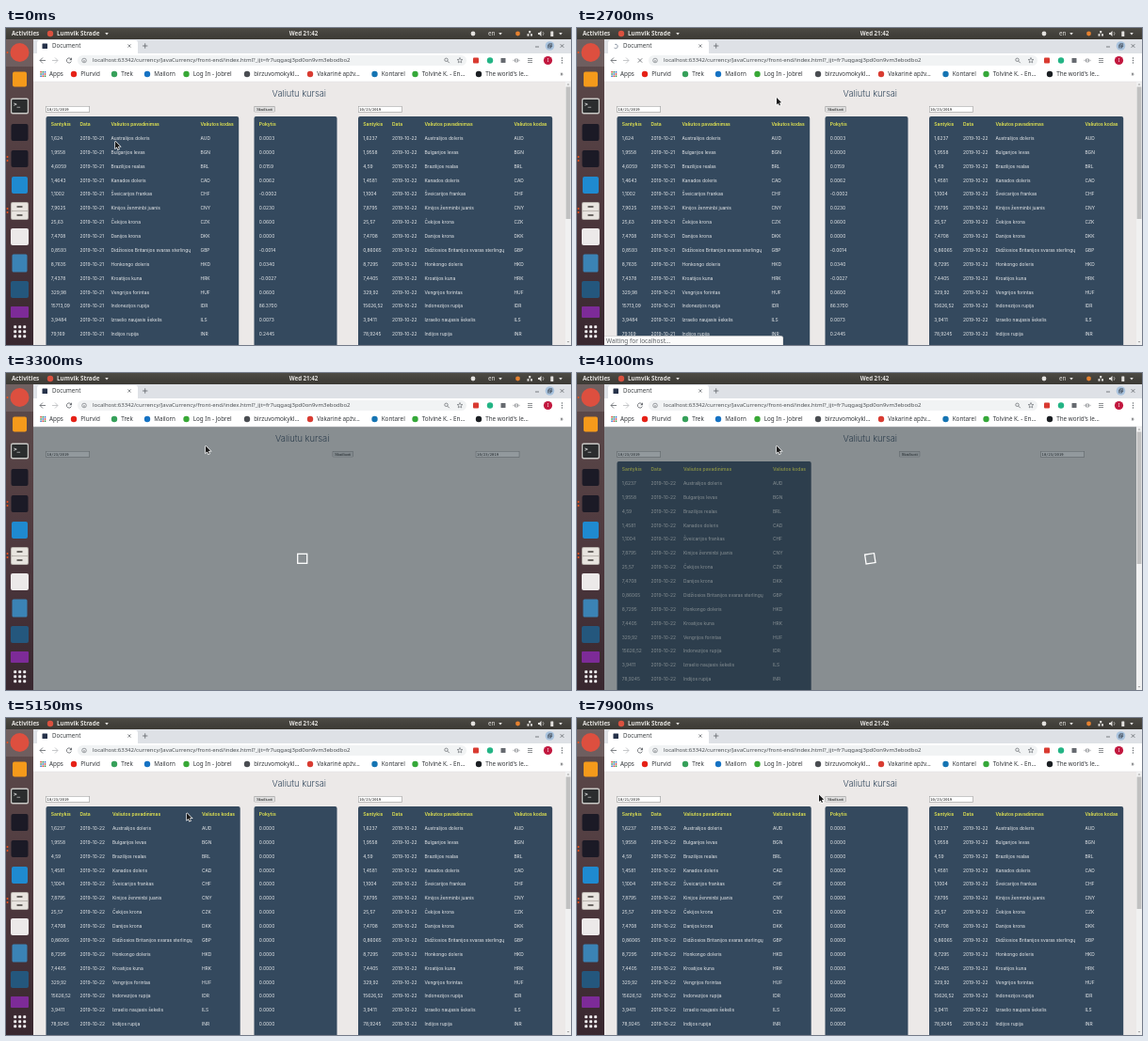
Write an HTML page with a canvas that moves like this. It is 600 px wide and 337 px high and loops after 8 s.

```html
<!DOCTYPE html>
<html lang="lt">
<head>
<meta charset="utf-8">
<title>Valiutu kursai</title>
<style>
html, body { margin: 0; width: 100%; height: 100%; overflow: hidden; }
canvas { display: block; width: 600px; height: 337px; }
</style>
</head>
<body>
<canvas id="stage"></canvas>
<script>
const W = 600, H = 337, LOOP = 8000;
const canvas = document.getElementById('stage');
const dpr = window.devicePixelRatio || 1;
canvas.width = W * dpr;
canvas.height = H * dpr;
const ctx = canvas.getContext('2d');

const UI = '"Noto Sans", sans-serif';
const BODY = 'Inter, sans-serif';
const MONO = '"DejaVu Sans Mono", monospace';

// name | code | first rate | second rate | difference
const rows = `Australijos doleris|AUD|1,624|1,6237|0.0003
Bulgarijos levas|BGN|1,9558|1,9558|0.0000
Brazilijos realas|BRL|4,6059|4,59|0.0159
Kanados doleris|CAD|1,4643|1,4581|0.0062
Šveicarijos frankas|CHF|1,1002|1,1004|-0.0002
Kinijos ženminbi juanis|CNY|7,9025|7,8795|0.0230
Čekijos krona|CZK|25,63|25,57|0.0600
Danijos krona|DKK|7,4708|7,4708|0.0000
Didžiosios Britanijos svaras sterlingų|GBP|0,8593|0,86065|-0.0014
Honkongo doleris|HKD|8,7635|8,7295|0.0340
Kroatijos kuna|HRK|7,4378|7,4405|-0.0027
Vengrijos forintas|HUF|329,98|329,92|0.0600
Indonezijos rupija|IDR|15713,09|15626,52|86.3700
Izraelio naujasis šekelis|ILS|3,9484|3,9411|0.0073
Indijos rupija|INR|79,169|78,9245|0.2445`.split('\n').map(row => row.split('|'));

// time, x, y of the pointer tip
const pointerPath = [
  [0, 116, 120.5], [800, 165, 116], [1000, 166, 116], [1150, 166, 116], [1450, 178, 116],
  [2000, 178, 116], [2600, 212, 74], [2700, 212, 74], [2950, 212, 77.5], [4550, 212, 77.5],
  [4850, 196, 97], [4950, 196, 97], [5150, 192, 101], [5250, 192, 101], [5750, 55, 84],
  [5800, 55, 84], [5950, 51, 84], [6900, 51, 84], [7400, 210, 84], [7550, 210, 84], [7900, 257, 81.5]
];

const LOAD_START = 1650, OVERLAY_START = 2750, LOAD_END = 3300;
const LEFT_READY = 3550, ALL_READY = 4300, DATE_EDITED = 6500;
const SPIN_START = 2735, SPIN_CYCLE = 2000;

function rect(x, y, w, h, fill, radius = 0) {
  ctx.fillStyle = fill;
  ctx.beginPath();
  ctx.roundRect(x, y, w, h, radius);
  ctx.fill();
}

function disc(x, y, r, fill) {
  ctx.fillStyle = fill;
  ctx.beginPath();
  ctx.arc(x, y, r, 0, Math.PI * 2);
  ctx.fill();
}

function line(color, width, ...pts) {
  ctx.strokeStyle = color;
  ctx.lineWidth = width;
  ctx.beginPath();
  pts.forEach(([x, y]) => ctx.lineTo(x, y));
  ctx.stroke();
}

function arc(x, y, r, from, to, color, width) {
  ctx.strokeStyle = color;
  ctx.lineWidth = width;
  ctx.beginPath();
  ctx.arc(x, y, r, from, to);
  ctx.stroke();
}

function polygon(fill, ...pts) {
  ctx.fillStyle = fill;
  ctx.beginPath();
  pts.forEach(([x, y]) => ctx.lineTo(x, y));
  ctx.fill();
}

function text(str, x, y, size, color, { font = UI, weight = 400, align = 'left' } = {}) {
  ctx.font = `${weight} ${size}px ${font}`;
  ctx.textAlign = align;
  ctx.fillStyle = color;
  ctx.fillText(str, x, y + size * 0.36);
}

function caret(x, y, color) {
  polygon(color, [x - 1.8, y - 1], [x + 1.8, y - 1], [x, y + 1.4]);
}

function cross(x, y, r, color, width) {
  line(color, width, [x - r, y - r], [x + r, y + r]);
  line(color, width, [x - r, y + r], [x + r, y - r]);
}

function shade(y0, y1, ...colors) {
  const gradient = ctx.createLinearGradient(0, y0, 0, y1);
  colors.forEach((color, i) => gradient.addColorStop(i / (colors.length - 1), color));
  return gradient;
}

// CSS "ease" curve
function ease(p) {
  const bezier = (a, b, s) => 3 * a * s * (1 - s) ** 2 + 3 * b * s * s * (1 - s) + s ** 3;
  let lo = 0, hi = 1;
  for (let i = 0; i < 20; i++) {
    const mid = (lo + hi) / 2;
    if (bezier(0.25, 0.25, mid) < p) lo = mid; else hi = mid;
  }
  return bezier(0.1, 1, lo);
}

function drawTopBar() {
  rect(0, 0, W, 12, shade(0, 12, '#4c4a44', '#3b3934'));
  const light = '#e4e2df', bold = { weight: 600 };
  text('Activities', 6, 6, 6.3, light, bold);
  disc(47, 6, 3.2, '#d9513f');
  text('Lumvik Strade', 54, 6, 6.3, light, bold);
  caret(107, 6, light);
  text('Wed 21:42', 316, 6, 6.1, light, { weight: 600, align: 'center' });
  disc(496, 6, 2.4, light);
  text('en', 512, 6, 6.3, light);
  caret(525, 6, light);
  disc(543.5, 6, 2.4, '#e5812f');
  rect(553.5, 6.2, 2, 2.4, light);
  rect(557, 6.2, 2, 2.4, light);
  rect(555.2, 3, 2, 2.4, light);
  polygon(light, [565, 5], [566.5, 5], [568.5, 3], [568.5, 9], [566.5, 7], [565, 7]);
  arc(568.5, 6, 2.4, -0.9, 0.9, light, 0.6);
  rect(578.3, 3.4, 3, 5.6, light, 0.5);
  caret(589, 6, light);
}

function drawDock() {
  rect(0, 12, 29, H - 12, shade(12, H, '#5c4b4b', '#503a3f', '#38272f'));
  rect(0, 12, 29, 29, 'rgba(255,255,255,.12)');

  disc(14.5, 26, 10, '#dd4f3f');
  rect(7, 46.5, 15, 16, '#f59a1b', 2);
  rect(5, 74.5, 19, 17, '#c9c9c6', 2);
  rect(6.2, 76, 16.6, 14, '#2b2d2e', 1);
  text('>_', 8, 81, 6, '#f2f2f2', { font: MONO, weight: 700 });
  rect(5.5, 102, 18, 18, '#1b1a26', 2);
  rect(5.5, 130, 18, 18, '#1b1a26', 2);
  rect(6, 158, 17, 18, '#1f8ad0', 2);

  rect(5, 185, 19, 19, '#b9b4ae', 2);
  rect(6, 186, 17, 8, '#e8e4df', 1);
  rect(6, 195, 17, 8, '#e8e4df', 1);
  rect(11.5, 189, 6, 2, '#6c6864', 0.5);
  rect(11.5, 198, 6, 2, '#6c6864', 0.5);

  rect(5, 213, 19, 18, '#ece9e9', 2);
  rect(6.5, 240.5, 16, 19, '#3b83b5', 1.5);
  rect(5, 269, 19, 18, '#24577d', 2);
  rect(5, 296, 19, 12, '#7d2b98', 1);

  [26, 137, 141, 192, 196].forEach(y => disc(1.5, y, 1, '#e95420'));
  for (let i = 0; i < 9; i++)
    rect(8.2 + (i % 3) * 5, 316.3 + Math.floor(i / 3) * 5, 3, 3, '#f0eef0', 0.8);
}

function drawBrowser(t) {
  const loading = t >= LOAD_START && t < LOAD_END;
  const gray = '#5f6368';
  rect(29, 12, W - 29, 15, '#dee1e6');
  rect(33, 13, 107, 15, '#fff', [3, 3, 0, 0]);
  if (loading) {
    const a = t / 1000 * Math.PI * 2;
    arc(41, 19.5, 2.2, a, a + 4.2, '#6f7b8c', 0.8);
  } else {
    rect(38.5, 16.5, 5.5, 5.5, '#26324a', 0.5);
  }
  text('Document', 49, 19, 6.2, '#3c4043');
  cross(131, 19, 1.6, gray, 0.7);
  line(gray, 0.8, [145, 19], [150.4, 19]);
  line(gray, 0.8, [147.7, 16.3], [147.7, 21.7]);
  line(gray, 0.8, [562, 20], [566, 20]);
  disc(577.5, 19, 4.8, '#a9c3de');
  ctx.strokeStyle = '#46505c';
  ctx.lineWidth = 0.7;
  ctx.strokeRect(575.7, 18, 3, 3);
  ctx.strokeRect(576.8, 16.8, 3, 3);
  cross(590.5, 19, 1.8, gray, 0.8);

  rect(29, 27, W - 29, 30, '#fff');
  rect(76, 29, 413, 11, '#f1f3f4', 5.5);
  line(gray, 0.8, [42, 34.5], [36, 34.5]);
  line(gray, 0.8, [39, 31.5], [36, 34.5], [39, 37.5]);
  line('#b8babd', 0.8, [49, 34.5], [55, 34.5]);
  line('#b8babd', 0.8, [52, 31.5], [55, 34.5], [52, 37.5]);
  if (loading) {
    cross(67, 34.5, 2.2, gray, 0.8);
  } else {
    arc(67, 34.5, 2.6, 0.4, 5.5, gray, 0.8);
    polygon(gray, [69.9, 31.3], [69.9, 34.2], [67.2, 34.2]);
  }
  arc(83, 34.5, 2.3, 0, Math.PI * 2, gray, 0.6);
  line(gray, 0.7, [83, 34], [83, 36]);
  text('localhost:63342/currency/JavaCurrency/front-end/index.html?_ijt=fr7uqgaqj3pd0on9vm3ebodbo2',
    92, 34.3, 5.97, '#4c5054');
  arc(467.5, 33.8, 1.7, 0, Math.PI * 2, gray, 0.7);
  line(gray, 0.8, [468.8, 35.2], [470.8, 37.2]);
  const star = Array.from({ length: 10 }, (_, i) => {
    const r = i % 2 ? 1.3 : 3, a = i * Math.PI / 5 - Math.PI / 2;
    return [482 + r * Math.cos(a), 34.5 + r * Math.sin(a)];
  });
  line(gray, 0.6, ...star, star[0]);
  rect(496, 31.5, 6, 6, '#d93a31', 1);
  disc(514, 34.5, 3.2, '#23b485');
  rect(525.5, 32, 5, 5, '#666a70', 0.5);
  [1.5, 3.5, 5, 3.5, 1.5].forEach((h, i) =>
    line(gray, 0.6, [539 + i * 1.5, 34.5 - h / 2], [539 + i * 1.5, 34.5 + h / 2]));
  [32.5, 34.5, 36.5].forEach(y => line(gray, 0.7, [554, y], [559, y]));
  disc(575.5, 34.5, 4.6, '#c2183f');
  text('I', 575.5, 34.5, 5, '#fff', { align: 'center' });
  [32, 34.5, 37].forEach(y => disc(590.5, y, 0.7, gray));

  const ink = '#34373b';
  for (let i = 0; i < 9; i++)
    rect(36.3 + (i % 3) * 2.2, 46 + Math.floor(i / 3) * 2.2, 1.6, 1.6,
      ['#d9493f', '#3f9a57', '#3f78d0'][(i + Math.floor(i / 3)) % 3]);
  text('Apps', 46, 49, 6.3, ink);
  [
    [72, '#e62117', 'Plurvid'], [115, '#36a05a', 'Trek'], [150, '#1673c4', 'Mailorn'],
    [191.5, '#38a836', 'Log In - Jobrel'], [256, '#4a4d52', 'birzuvomokykl…'],
    [323, '#d93c32', 'Vakarinė apžv…'], [391.5, '#1574b3', 'Kontarel'],
    [434.5, '#35a839', 'Tolvinė K. - En…'], [502, '#1b1f23', "The world's le…"]
  ].forEach(([x, color, label]) => {
    disc(x, 49, 3.2, color);
    text(label, x + 7.2, 49, 6.3, ink);
  });
  text('»', 588.5, 48.5, 6.3, ink);
  line('#dcdee0', 0.5, [29, 57], [W, 57]);
}

function drawField(x, value) {
  rect(x, 83, 46.5, 6.7, '#8f8f8f');
  rect(x + 0.5, 83.5, 45.5, 5.7, '#fff');
  text(value, x + 1.3, 86.2, 3.8, '#111', { font: MONO });
}

function drawButton(x) {
  rect(x, 83, 22, 6.3, '#8c8c8c', 0.7);
  rect(x + 0.4, 83.4, 21.2, 5.5, '#dedede', 0.5);
  text('Skaičiuoti', x + 11, 86.1, 3.9, '#111', { font: '"Liberation Sans", sans-serif', align: 'center' });
}

function drawTable(x, w, labels, columns, cells) {
  rect(x, 94, w, H, '#34495e', 2);
  labels.forEach((label, i) =>
    text(label, columns[i], 102, 5, '#e4e650', { font: BODY, weight: 600 }));
  rows.forEach((row, r) => cells(row).forEach((cell, i) =>
    text(cell, columns[i], 117.2 + r * 14.87, 4.9, '#e9ebed', { font: BODY })));
}

function drawRates(x, w, shift, date, rateIndex) {
  drawTable(x, w, ['Santykis', 'Data', 'Valiutos pavadinimas', 'Valiutos kodas'],
    [x + 5.3, x + 36, x + 69 + shift, x + 164 + shift],
    row => [row[rateIndex], date, row[0], row[1]]);
}

// Half a turn, a rest, half a turn, a rest
function drawLoader(x, t) {
  const quarter = (t - SPIN_START) % SPIN_CYCLE / (SPIN_CYCLE / 4);
  const turn = Math.floor(quarter / 2) + ease(Math.min(1, quarter % 2));
  ctx.save();
  ctx.translate(x, 197.3);
  ctx.rotate(turn * Math.PI);
  ctx.strokeStyle = '#fff';
  ctx.lineWidth = 1.3;
  ctx.strokeRect(-5, -5, 10, 10);
  ctx.restore();
}

function drawPage(t) {
  const reloaded = t >= OVERLAY_START;
  const busy = reloaded && t < ALL_READY;
  const scrollable = !reloaded || t >= LEFT_READY;
  const right = scrollable ? 594 : W;
  const center = scrollable ? 311.3 : 314.7;

  ctx.save();
  ctx.beginPath();
  ctx.rect(29, 57, W - 29, H - 57);
  ctx.clip();
  rect(29, 57, W - 29, H - 57, '#ece9e8');
  text('Valiutu kursai', center, 70, 9.3, '#34495e', { font: BODY, weight: 300, align: 'center' });
  drawField(42.3, reloaded && t < DATE_EDITED ? '10/23/2019' : '10/21/2019');
  drawButton(!busy ? 263.5 : scrollable ? 342.2 : 346.7);
  drawField(!busy ? 374 : scrollable ? 492.3 : 498.8, '10/23/2019');

  if (!reloaded) drawRates(42.5, 204.7, 0, '2019-10-21', 2);
  else if (t >= LEFT_READY) drawRates(42.5, 206.2, 1.4, '2019-10-22', 3);
  if (busy) {
    rect(29, 57, right - 29, H - 57, 'rgba(38,52,61,.5)');
    drawLoader(center, t);
  } else {
    drawTable(263.5, 88, ['Pokytis'], [268.7], row => [reloaded ? '0.0000' : row[4]]);
    drawRates(374, 206.2, 1.4, '2019-10-22', 3);
  }
  if (scrollable) {
    rect(594, 57, 6, H - 57, '#f1f1f1');
    rect(594.6, 62.5, 4.8, 140.5, '#c1c1c1');
    polygon('#999', [597, 59], [598.3, 60.6], [595.7, 60.6]);
    polygon('#999', [597, 334.5], [598.3, 332.9], [595.7, 332.9]);
  }
  if (t >= LOAD_START && t < LOAD_END) {
    rect(29, 327.3, 190, 10, '#c9c9c9', [0, 2, 0, 0]);
    rect(29, 327.8, 189.5, 10, '#fafafa', [0, 2, 0, 0]);
    text('Waiting for localhost…', 31, 332.2, 6.5, '#5f6368');
  }
  ctx.restore();
}

function drawPointer(t) {
  const next = pointerPath.findIndex(key => key[0] > t);
  let [, x, y] = pointerPath[pointerPath.length - 1];
  if (next > 0) {
    const [t0, x0, y0] = pointerPath[next - 1], [t1, x1, y1] = pointerPath[next];
    const p = (t - t0) / (t1 - t0);
    x = x0 + (x1 - x0) * p;
    y = y0 + (y1 - y0) * p;
  }
  const shape = [[0, 0], [0, 7.4], [1.7, 5.9], [2.9, 8.6], [4, 8.1], [2.9, 5.4], [5.2, 5.3]]
    .map(([dx, dy]) => [x + dx, y + dy]);
  line('#fff', 1.3, ...shape, shape[0]);
  polygon('#1a1a1a', ...shape);
}

const start = performance.now();

function frame() {
  const t = Math.floor((performance.now() - start) % LOOP / 50) * 50;
  ctx.setTransform(dpr, 0, 0, dpr, 0, 0);
  drawPage(t);
  drawBrowser(t);
  drawDock();
  drawTopBar();
  drawPointer(t);
  requestAnimationFrame(frame);
}

frame();
</script>
</body>
</html>
```
